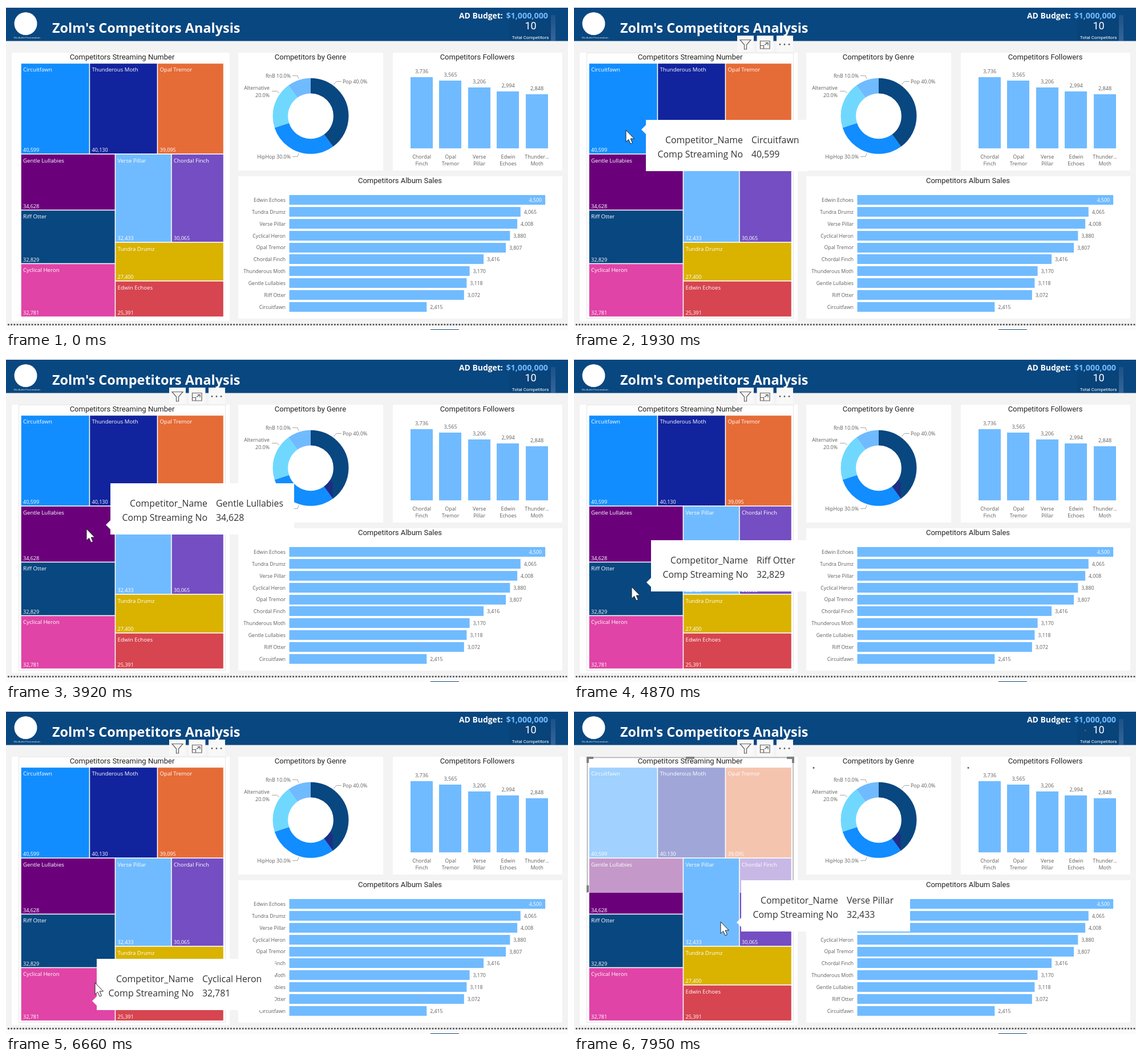
Recreate the animation shown at these times as an HTML page. Size 985 by 569 pixels, loop 8000 ms.

```html
<!DOCTYPE html>
<html lang="en">
<head>
<meta charset="utf-8">
<title>Competitors Analysis</title>
<style>
  html, body { margin: 0; width: 100%; height: 100%; overflow: hidden; background: #f3f3f3; }
  svg { display: block; width: 985px; height: 569px; }
  text { font-family: "Open Sans", "Noto Sans", sans-serif; white-space: pre; }
  .din { font-family: Roboto, "Liberation Sans", sans-serif; }
  .bold { font-weight: 700; }
</style>
</head>
<body>
<svg id="stage" viewBox="0 0 985 569"></svg>
<script>
const NS = 'http://www.w3.org/2000/svg';
const stage = document.getElementById('stage');
const LOOP = 8000;
const NAVY = '#094780', SKY = '#70bbff', BLUE = '#118dff', CYAN = '#70d8ff';
const INK = '#252423', GREY = '#605e5c';

function add(tag, attrs, parent = stage) {
  const el = document.createElementNS(NS, tag);
  for (const key in attrs) el.setAttribute(key, attrs[key]);
  return parent.appendChild(el);
}
const group = (parent = stage) => add('g', {}, parent);
const rect = (x, y, width, height, fill, parent) => add('rect', { x, y, width, height, fill }, parent);
const line = (d, stroke, width, parent) =>
  add('path', { d, stroke, 'stroke-width': width, fill: 'none' }, parent);
function label(x, y, text, size, fill = GREY, anchor = 'start', cls = '', parent = stage) {
  const el = add('text', { x, y, fill, 'font-size': size, 'text-anchor': anchor, class: cls }, parent);
  el.textContent = text;
  return el;
}
const heading = (x, y, text) => label(x, y, text, 13, INK, 'middle', 'din');

// Artists: name, streams, colour, tile box, tooltip width
const artists = {
  circuit: ['Circuitfawn', '40,599', BLUE, [26, 100.5, 120.5, 159.5], 285],
  thunder: ['Thunderous Moth', '40,130', '#12239e', [146.5, 100.5, 119, 159.5], 338],
  opal: ['Opal Tremor', '39,095', '#e66c37', [265.5, 100.5, 116, 159.5], 292],
  gentle: ['Gentle Lullabies', '34,628', '#6b007b', [26, 260, 165.5, 98.5], 322],
  riff: ['Riff Otter', '32,829', NAVY, [26, 358.5, 165.5, 94], 281],
  heron: ['Cyclical Heron', '32,781', '#e044a7', [26, 452.5, 165.5, 93.5], 312],
  verse: ['Verse Pillar', '32,433', SKY, [191.5, 260, 98.5, 155], 296],
  finch: ['Chordal Finch', '30,065', '#744ec2', [290, 260, 91.5, 155], 306],
  tundra: ['Tundra Drumz', '27,400', '#d9b300', [191.5, 415, 190, 68], 304],
  edwin: ['Edwin Echoes', '25,391', '#d64550', [191.5, 483, 190, 63], 300]
};

function drawHeader() {
  rect(0, 0, 985, 3, '#fff');
  rect(0, 3, 985, 58.5, NAVY);
  add('circle', { cx: 34.5, cy: 31, r: 20, fill: '#fff' });
  label(37, 57.3, 'Elm Audio Presentations', 4.1, '#fff', 'middle');
  label(81, 46.5, "Zolm's Competitors Analysis", 23.45, '#fff', 'start', 'bold');
  rect(882, 20, 73, 41, '#08437a');
  const shade = add('linearGradient', { id: 'shade', x1: 0, y1: 0, x2: 0, y2: 1 });
  add('stop', { offset: 0, 'stop-color': '#1d5288' }, shade);
  add('stop', { offset: 1, 'stop-color': '#35659a' }, shade);
  rect(955, 16, 8, 45, 'url(#shade)');
  label(794, 22, 'AD Budget:', 13.9, '#fff', 'start', 'bold');
  label(950, 22, '$1,000,000', 14.3, SKY, 'end', 'bold');
  label(919.5, 41, '10', 18, '#fff', 'middle', 'din');
  label(919, 57.5, 'Total Competitors', 8.1, '#fff', 'middle', 'din');
}

function drawTreemap() {
  heading(203.5, 94, 'Competitors Streaming Number');
  for (const [name, streams, color, [x, y, w, h]] of Object.values(artists)) {
    const tile = rect(x, y, w, h, color);
    tile.setAttribute('stroke', '#fff');
    tile.setAttribute('stroke-width', 1.4);
    label(x + 4, y + 14.5, name, 9.7, '#fff');
    label(x + 4, y + h - 4, streams, 9.1, '#fff');
  }
}

function ringSlice(from, size, stroke) {
  return add('circle', {
    cx: 534, cy: 193.3, r: 53.2, fill: 'none', stroke, 'stroke-width': 26.6, pathLength: 100,
    'stroke-dasharray': `${size} ${100 - size}`, 'stroke-dashoffset': -from,
    transform: 'rotate(-90 534 193.3)'
  });
}

function drawGenres() {
  heading(533.5, 94, 'Competitors by Genre');
  ringSlice(0, 40, NAVY);
  ringSlice(40, 30, BLUE);
  ringSlice(70, 20, CYAN);
  ringSlice(90, 10, SKY);
  line('M574 138l5-5.5h9M502 122.5h9l2 5.5M466 149.5h9l4 3.5M502 264.5h9l2-6', '#a6a6a6', 1);
  label(590, 136, 'Pop 40.0%', 8.9);
  [[499, 126, 'RnB 10.0%'], [462, 147.3, 'Alternative'], [462, 159.5, '20.0%'], [499, 268, 'HipHop 30.0%']]
    .forEach(([x, y, text]) => label(x, y, text, 8.9, GREY, 'end'));
}

function drawFollowers() {
  heading(826, 94, 'Competitors Followers');
  [['Chordal Finch', 3736], ['Opal Tremor', 3565], ['Verse Pillar', 3206],
   ['Edwin Echoes', 2994], ['Thunder… Moth', 2848]].forEach(([name, count], i) => {
    const x = 709 + 50.5 * i, top = Math.round(250 - count * 0.03346), mid = x + 19.6;
    rect(Math.floor(x), top, 39, 250 - top, SKY);
    label(mid, top - 7, count.toLocaleString('en-US'), 9.1, GREY, 'middle');
    name.split(' ').forEach((word, row) => label(mid, 268 + 12.3 * row, word, 9, GREY, 'middle'));
  });
}

function drawSales() {
  heading(690.5, 311, 'Competitors Album Sales');
  const sales = { edwin: 4500, tundra: 4065, verse: 4008, heron: 3880, opal: 3807,
    finch: 3416, thunder: 3170, gentle: 3118, riff: 3072, circuit: 2415 };
  Object.entries(sales).forEach(([id, count], i) => {
    const mid = 340.8 + 20.83 * i, end = 496.5 + count * 0.0997;
    rect(496.5, Math.round(mid - 8.5), end - 496.5, 17, SKY);
    label(490, mid + 3.3, artists[id][0], 8.8, GREY, 'end');
    const inside = i === 0;
    label(end + (inside ? -6 : 6), mid + 3.5, count.toLocaleString('en-US'), 8.8,
      inside ? '#fff' : GREY, inside ? 'end' : 'start');
  });
}

function drawToolbar() {
  const g = group();
  add('rect', { x: 22.5, y: 82.5, width: 362, height: 466, fill: 'none', stroke: '#e6e6e6' }, g);
  [286, 320.5, 355].forEach(x => rect(x, 52, 29, 29, '#f8f8f8', g));
  line('M291 59.5h19l-7.5 8.5v8h-4v-8z', GREY, 1.2, g);
  line('M326.5 61.5h16.500v13.500h-16.500zM326.5 69.5h6v5.500M334 68.500l5.500-4M335.500 64.500h4.500v4.500', GREY, 1.2, g);
  [361, 369, 377].forEach(cx => add('circle', { cx, cy: 67.5, r: 1.4, fill: GREY }, g));
  return g;
}

function drawSelection() {
  const g = group(), cut = 321;
  for (const [id, [, , , [x, y, w, h]]] of Object.entries(artists)) {
    if (id === 'verse' || y > cut) continue;
    rect(x, y, w, Math.min(h, cut - y), '#fff', g).setAttribute('fill-opacity', 0.6);
  }
  line('M23.5 321V83.500H384V300', '#b0b0b0', 1.5, g);
  line('M24 93V84H34M373 84H384V93M196 84H211M24 308V320', '#808080', 4, g);
  [[420, 101.5], [691, 101.5], [896, 36]].forEach(([cx, cy]) =>
    add('circle', { cx, cy, r: 1.5, fill: GREY }, g));
  return g;
}

function drawTooltip() {
  const g = group();
  const box = rect(0, 0, 0, 90, '#fff', g);
  const arrow = add('path', { d: 'M.5-8.500L-8 0L.5 8.500z', fill: '#fff' }, g);
  const text = (x, y, s, anchor) => label(x, y, s, 15.9, '#333', anchor, '', g);
  text(170, 40.5, 'Competitor_Name', 'end');
  text(170, 65.5, 'Comp Streaming No', 'end');
  return { g, box, arrow, name: text(185, 40.5, ''), streams: text(185, 65.5, '') };
}

rect(0, 0, 985, 569, '#f3f3f3');
[[10, 82, 382, 471], [407, 82, 254, 207], [678, 82, 297, 207], [407, 299, 568, 250]]
  .forEach(box => rect(...box, '#fff'));
rect(0, 562, 985, 7, '#fbfbfb');
line('M3 559.5H985', '#484848', 2.6).setAttribute('stroke-dasharray', '2.8 2.4');
rect(744, 568, 50, 1, NAVY);
drawHeader();
drawTreemap();
drawGenres();
const clip = add('clipPath', { id: 'sliver' });
rect(500, 120, 73, 150, '#000', clip);
const sliver = add('g', { 'clip-path': 'url(#sliver)' });
sliver.append(ringSlice(34, 6, '#1c2f85'));
drawFollowers();
drawSales();
const toolbar = drawToolbar();
const selection = drawSelection();
const tooltip = drawTooltip();
const ring = add('circle', { cx: 257, cy: 372, r: 14, fill: '#fff', 'fill-opacity': 0.25, stroke: '#fff', 'stroke-opacity': 0.5 });
const cursor = add('path', {
  d: 'M0 0V20.500L4.600 16.300L8 24L11.500 22.500L8.200 15H14.500Z',
  fill: '#fff', stroke: '#222', 'stroke-width': 1, 'stroke-linejoin': 'round'
});

// Motion tables: time, x, y
const cursorPath = [
  [260, 955, 400], [500, 600, 330], [720, 300, 290], [990, 105, 272], [1320, 105, 272],
  [1520, 91, 218], [2719, 91, 218], [3050, 199, 187], [3719, 199, 187], [3920, 141, 300],
  [4270, 113, 345], [4600, 113, 345], [4870, 101, 402], [5070, 111, 425], [5859, 111, 425],
  [5860, 123, 432], [6400, 120, 514], [6590, 120, 514], [6660, 156, 479], [6900, 225, 410], [7230, 257, 372]
];
const tipPath = [
  [1930, 118, 217], [2720, 118, 217], [3050, 226, 186], [3720, 226, 186], [3920, 175, 293],
  [4270, 140, 346], [4600, 140, 346], [4870, 127, 394], [5070, 138, 427], [5859, 138, 427],
  [5860, 143.5, 427], [6400, 147, 514], [6590, 147, 514], [6660, 151, 511], [6900, 250, 416], [7230, 285, 373]
];
// Hovered artist and height of the arrow on the tooltip
const hovers = [
  [1930, 'circuit', 17], [2860, 'thunder', 17], [3850, 'gentle', 73], [4730, 'riff', 74],
  [6000, 'heron', 74], [6790, 'tundra', 74], [6900, 'verse', 74]
];

function pointAt(path, t) {
  const next = path.findIndex(key => key[0] > t);
  if (next < 0) return path[path.length - 1].slice(1);
  if (next === 0) return path[0].slice(1);
  const [t0, x0, y0] = path[next - 1], [t1, x1, y1] = path[next];
  const k = (t - t0) / (t1 - t0);
  return [x0 + (x1 - x0) * k, y0 + (y1 - y0) * k];
}
const show = (el, visible) => el.setAttribute('visibility', visible ? 'visible' : 'hidden');
const move = (el, x, y) => el.setAttribute('transform', `translate(${Math.round(x)} ${Math.round(y)})`);

function render(t) {
  show(toolbar, t >= 720);
  show(sliver, t >= 3720);
  show(selection, t >= 7950);
  show(ring, t >= 7230 && t < 7430);
  show(cursor, t >= 260);
  move(cursor, ...pointAt(cursorPath, t));

  const hover = hovers.filter(h => h[0] <= t).pop();
  show(tooltip.g, hover);
  if (!hover) return;
  const [, id, arrowY] = hover;
  const [name, streams, , , width] = artists[id];
  const [x, y] = pointAt(tipPath, t);
  move(tooltip.g, x + 8, y - arrowY);
  move(tooltip.arrow, 0, arrowY);
  tooltip.box.setAttribute('width', width);
  tooltip.name.textContent = name;
  tooltip.streams.textContent = streams;
}

const start = performance.now();
function tick() {
  render((performance.now() - start) % LOOP);
  requestAnimationFrame(tick);
}
tick();
</script>
</body>
</html>
```
